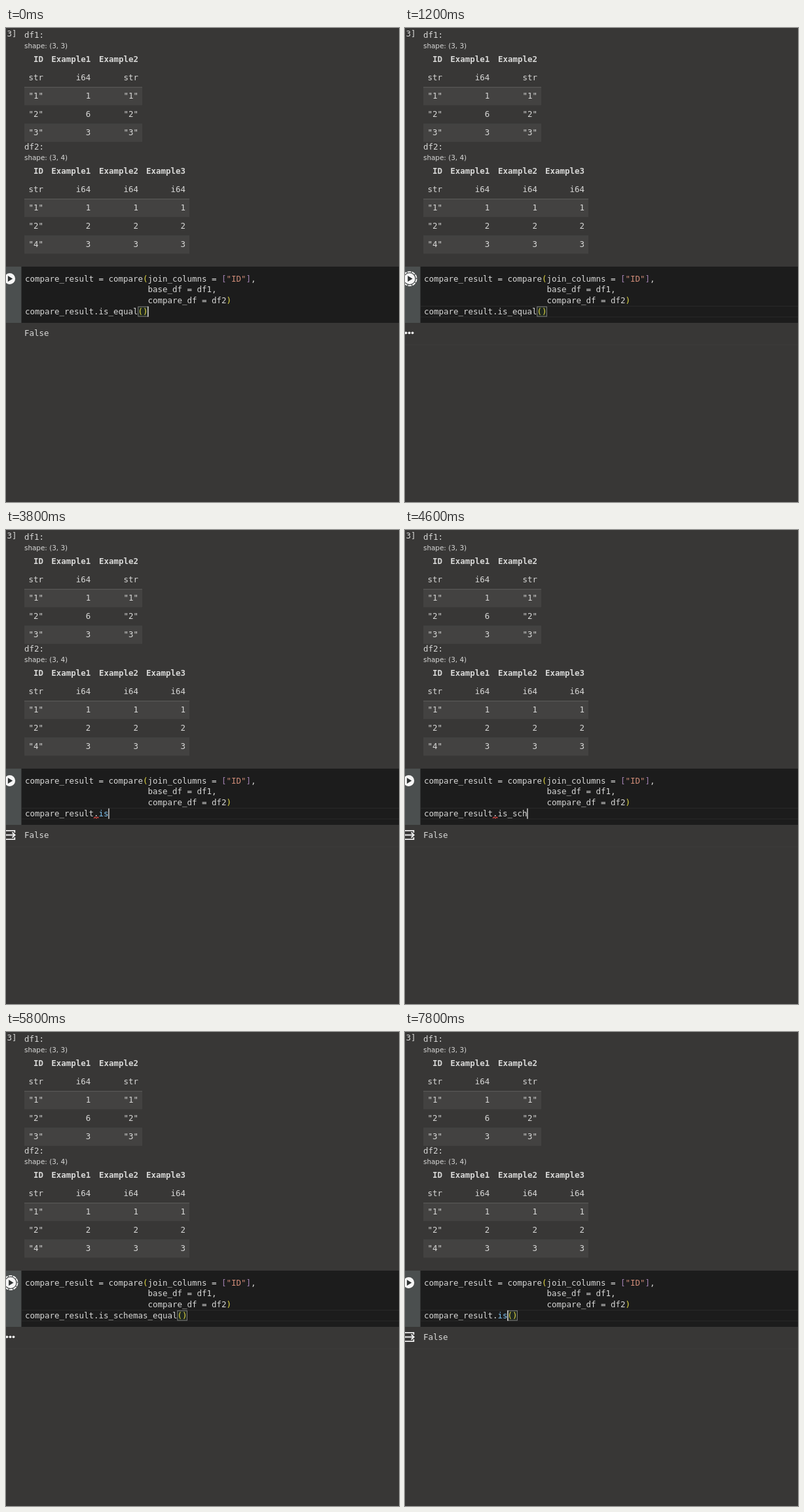
Recreate the animation shown at these times as an HTML page. Size 600 by 725 pixels, loop 8000 ms.

```html
<!DOCTYPE html>
<html lang="en">
<head>
<meta charset="utf-8">
<title>Notebook comparison</title>
<style>
  html, body { margin: 0; width: 600px; height: 725px; overflow: hidden; background: #383736; }
  svg { display: block; }
  text { font: 12.46px "DejaVu Sans Mono", monospace; fill: #d8d8d7; white-space: pre; }
  .bold { font-weight: bold; }
  .shape { font: 10.4px "DejaVu Sans", sans-serif; }
  .end { text-anchor: end; }
  .paren { fill: #e2d844; }
  .square { fill: #a583b5; }
  .string { fill: #d08c78; }
  .keyword { fill: #82c6f5; }
  .match { fill: #2ba6f5; font-weight: bold; }
  .hint { font-size: 10.63px; fill: #b3c3d0; }
</style>
</head>
<body>
<svg width="600" height="725" viewBox="0 0 600 725">
  <g id="page"></g>
  <g id="live"></g>
</svg>
<script>
const LOOP = 8000, STEP = 200, CHAR = 7.5, LEFT = 29;
const page = document.getElementById('page');
const live = document.getElementById('live');

const text = (x, y, content, cls = '') => `<text x="${x}" y="${y}" class="${cls}">${content}</text>`;
const rect = (x, y, w, h, fill) => `<rect x="${x}" y="${y}" width="${w}" height="${h}" fill="${fill}"/>`;
const line = (d, color, width) => `<path d="${d}" fill="none" stroke="${color}" stroke-width="${width}"/>`;
const span = (cls, content) => `<tspan class="${cls}">${content}</tspan>`;

function table(y, name, shape, width, rows) {
  const edges = [57, 129.3, 202, 274];
  const top = y + 75;
  let out = text(28, y, name + ':') + text(28, y + 15.6, 'shape: ' + shape, 'shape');
  out += rect(28, top, width, 28, '#434241') + rect(28, top + 56, width, 28, '#434241');
  out += rect(28, top, width, 1, '#5d5c5b');
  rows.forEach((row, r) => row.split(' ').forEach((cell, c) => {
    out += text(edges[c], y + 37 + r * 28.05, cell, r ? 'end' : 'end bold');
  }));
  return out;
}

page.innerHTML =
  text(1.5, 12.5, '3]') +
  table(15.2, 'df1', '(3, 3)', 180,
    ['ID Example1 Example2', 'str i64 str', '"1" 1 "1"', '"2" 6 "2"', '"3" 3 "3"']) +
  table(186.2, 'df2', '(3, 4)', 252,
    ['ID Example1 Example2 Example3', 'str i64 i64 i64', '"1" 1 1 1', '"2" 2 2 2', '"4" 3 3 3']) +
  rect(0, 365, 600, 86, '#1c1c1c') + rect(0, 365, 23.5, 86, '#4b4f4f') +
  text(LEFT, 387.8, 'compare_result = compare' + span('paren', '(') + 'join_columns = ' +
    span('square', '[') + span('string', '"ID"') + span('square', ']') + ',') +
  text(LEFT + 25 * CHAR, 404.4, 'base_df = df1,') +
  text(LEFT + 25 * CHAR, 421.4, 'compare_df = df2' + span('paren', ')'));

// Each entry: start time, text after "compare_result", caret offset (-1 hides it).
const edits = [
  [0, '.is_equal()', 11], [400, '.is_equal()', -1], [1600, '.is_equal()', 11],
  [1800, '.is_equal(', 10], [2000, '.is_equa', 8], [2200, '.is_', 4],
  [2400, '', 0], [2800, '', -1], [3000, '', 0], [3400, '.', 1],
  ...[...Array(7).keys()].map(i => [3800 + i * STEP, '.is_schem'.slice(0, 3 + i), 3 + i]),
  [5400, '.is_schemas_equal', 17], [5600, '.is_schemas_equal()', 19],
  [5800, '.is_schemas_equal()', -1], [7000, '.is_schemas_equal()', 17],
  [7200, '.is_schemas_equa()', 16], [7400, '.is_schemas_()', 12],
  [7600, '.is_sch()', 7], [7800, '.is()', 3]
];

function runButton(running, t) {
  const x = running ? 7 : 5.7;
  let out = `<circle cx="${x}" cy="383.5" r="8.4" fill="#f5f5f5"/>` +
    `<path d="M${x - 2.8} 379l7.3 4.5l-7.3 4.5z" fill="#303434"/>`;
  if (running) {
    out += `<circle cx="7" cy="383.5" r="10.6" fill="none" stroke="#f5f5f5" stroke-width="1.8"
      stroke-dasharray="5.4 1.26" transform="rotate(${t * 0.18} 7 383.5)"/>`;
  }
  return out;
}

function output(running, icon) {
  if (running) {
    return [1.5, 6.5, 11.5].map(x => `<circle cx="${x}" cy="466.3" r="1.9" fill="#eee"/>`).join('');
  }
  return text(28, 470.6, 'False') + (icon ?
    line('M0 459.8H13.3V463M13.3 470V473.2H0', '#eee', 1.8) +
    line('M0 466.5H13M9.5 462.5L13.7 466.5L9.5 470.5', '#eee', 1.8) : '');
}

function popup() {
  return rect(201.5, 442, 384, 19, '#454545') + rect(202.5, 442.5, 382, 17.5, '#04395e') +
    line('M211 444.8L216.2 447.6V453.8L211 456.8L205.8 453.8V447.6ZM205.8 447.6L211 450.5L216.2 447.6M211 450.5V456.8',
      '#e4e8ec', 1.1) +
    text(221.5, 455.2, span('match', 'is_schem') + 'as_equal') +
    text(384.3, 454.6, 'def is_schemas_equal() -&gt; bool', 'hint');
}

function draw(t) {
  const [, tail, caret] = edits.filter(e => e[0] <= t).pop();
  const running = (t >= 400 && t < 1600) || (t >= 5800 && t < 6600);
  const base = LEFT + 14 * CHAR;
  const word = tail.replace(/[.()]/g, '');
  const parens = tail.replace(/[^()]/g, '');
  let out = '';

  if (t >= 400) {
    out += rect(24, 425, 576, 1, '#292929') + rect(24, 441.5, 576, 1, '#292929') +
      rect(0, 484, 600, 1, '#3c3b3a');
  }
  if (parens.length === 2) {
    const x = base + (tail.length - 2) * CHAR;
    out += `<rect x="${x + .3}" y="426.3" width="14.6" height="14.8" fill="#202820" stroke="#878787" stroke-width=".9"/>`;
  }
  out += text(LEFT, 438.2, 'compare_result' + (tail && '.') +
    span(word === 'is' ? 'keyword' : '', word) + span('paren', parens));
  if (t >= 3600 && t < 5400) {
    out += line(`M${base} 441l2-2l2 2l2-2l1.5 1.5`, '#e04a45', 1.1);
  }
  if (caret >= 0) out += rect(base + caret * CHAR - .2, 425.8, 1.3, 16, '#e4e4e4');
  out += runButton(running, t) + output(running, t >= 400);
  if (t >= 5000 && t < 5400) out += popup();
  live.innerHTML = out;
}

let last = -1;
function tick() {
  const t = Math.floor(performance.now() % LOOP / STEP) * STEP;
  if (t !== last) draw(last = t);
  requestAnimationFrame(tick);
}
tick();
</script>
</body>
</html>
```
